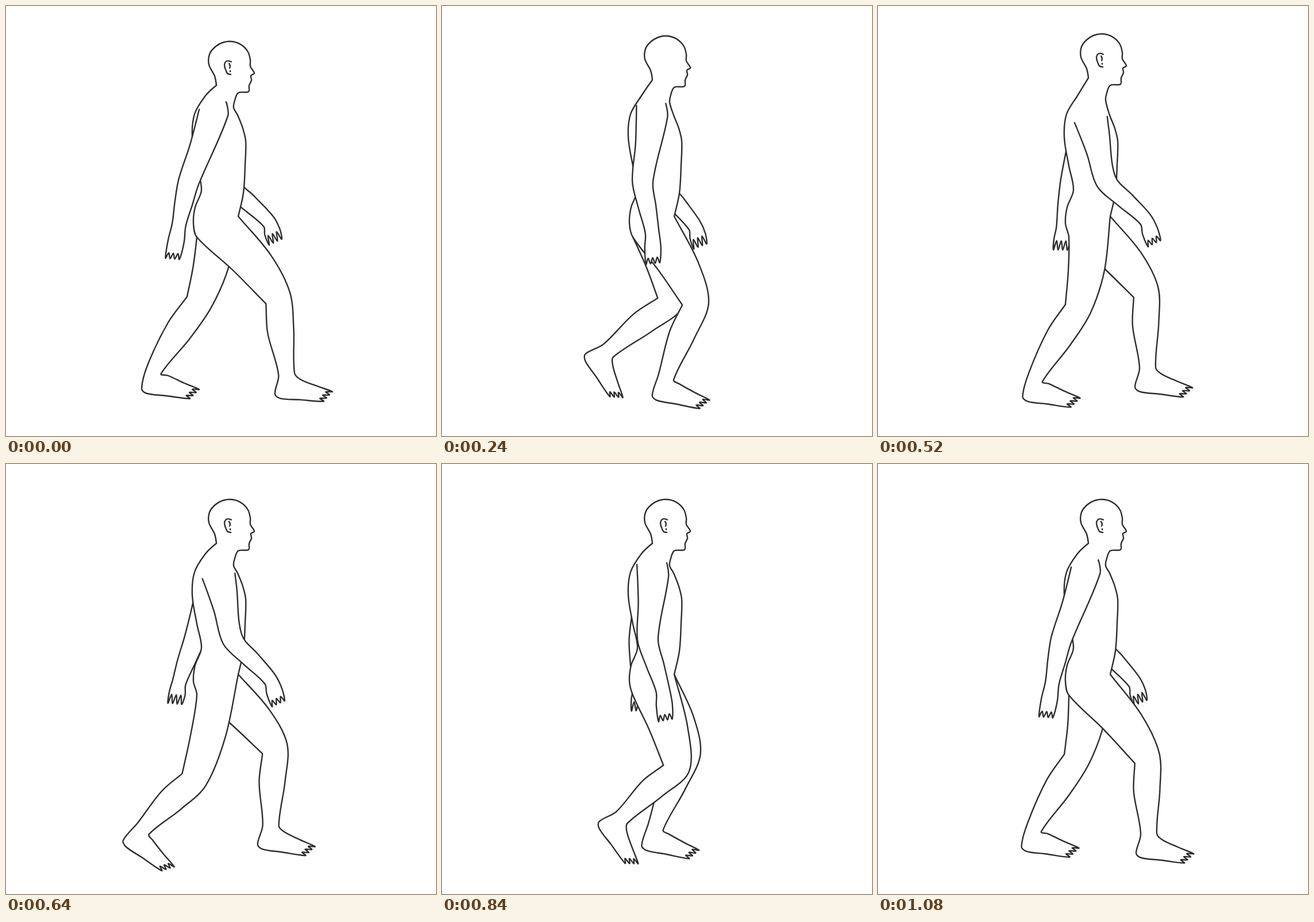
These frames come from a looping animation (748 by 748 pixels, 1120 ms). An HTML page:

```html
<!DOCTYPE html>
<html lang="en">
<head>
<meta charset="utf-8">
<title>Walk cycle</title>
<style>
html, body { margin: 0; width: 100%; height: 100%; overflow: hidden; background: #fff; }
svg { display: block; width: 100%; height: 100%; }
path { fill: #fff; stroke: #2d2d2e; stroke-width: 2.4; stroke-linecap: round; stroke-linejoin: round; }
#ear { fill: none; }
</style>
</head>
<body>
<svg viewBox="0 0 748 748">
  <path id="farArm"/>
  <path id="farLeg"/>
  <path id="body"/>
  <path id="nearArm"/>
  <path id="ear" d="M392 97Q382 92 380 102Q380 108 383 113Q384 119 391 119M388 100Q391 104 389 108M390 113v1"/>
</svg>
<script>
const LOOP = 1120, STEP = 40;
const BUTTOCK = [332, 402], GROIN = [404, 366], HIP = [366, 384];

// Stride poses: time, knee x y, ankle x y, foot pitch in degrees.
const STRIDE = [
  [0, 473, 508, 488, 640, -3],
  [160, 462, 513, 421, 645, 6],
  [240, 441, 518, 390, 645, 4],
  [400, 388, 523, 324, 646, 5],
  [560, 338, 529, 260, 646, 0],
  [640, 327, 549, 239, 634, 27],
  [720, 368, 540, 256, 620, 43],
  [820, 404, 529, 302, 613, 49],
  [960, 424, 531, 389, 644, 2],
  [1080, 468, 512, 471, 643, 0]
];

const BACK = [[366, 138], [347, 156], [328, 188], [324, 228], [332, 278], [340, 320], [329, 350], [326, 378]];
const CHEST = [[413, 325], [416, 275], [417, 235], [412, 213], [403, 190]];
const HEAD = [
  [396, 177], [398, 164], [404, 151], [422, 149], [423, 138], [427, 129], [426, 121], [432, 117], [425, 105],
  [425, 94], [421, 80], [410, 68], [395, 62], [379, 63], [364, 71], [354, 84], [353, 102], [363, 122]
];

const add = (p, q, k = 1) => [p[0] + k * q[0], p[1] + k * q[1]];
const mix = (p, q, u) => [p[0] + (q[0] - p[0]) * u, p[1] + (q[1] - p[1]) * u];
const ramp = (t, from, to) => Math.min(1, Math.max(0, (t - from) / (to - from)));

// Unit normal pointing forward for a limb running downward from p to q.
function normal(p, q) {
  const dx = q[0] - p[0], dy = q[1] - p[1], len = Math.hypot(dx, dy);
  return [dy / len, -dx / len];
}

const bulge = (p, q, u, amount) => add(mix(p, q, u), normal(p, q), amount);

// Maps limb-local points to the stage.
const placer = (origin, angle) => ([x, y]) => add(origin, [
  x * Math.cos(angle) - y * Math.sin(angle),
  x * Math.sin(angle) + y * Math.cos(angle)
]);

// Fingers or toes: tips between two points with a notch after each but the last.
function fringe(from, to, count, notch) {
  const pts = [from];
  for (let i = 1; i < count; i++) {
    pts.push(add(mix(from, to, (i - 0.5) / (count - 1)), notch), mix(from, to, i / (count - 1)));
  }
  return pts;
}

// Periodic monotone cubic blend of the stride poses.
function strideAt(time) {
  const t = time % LOOP, n = STRIDE.length;
  const key = i => STRIDE[(i + n) % n].map((v, c) => c ? v : v + LOOP * Math.floor(i / n));
  const i = STRIDE.findLastIndex(row => row[0] <= t);
  const [a, b, c, d] = [key(i - 1), key(i), key(i + 1), key(i + 2)];
  const h = c[0] - b[0], u = (t - b[0]) / h;
  const rate = (p, q, col) => (q[col] - p[col]) / (q[0] - p[0]);
  const slope = (r, s) => r * s <= 0 ? 0 : 2 * r * s / (r + s);
  return [1, 2, 3, 4, 5].map(col => {
    const r = rate(b, c, col), dv = r * h;
    const m0 = slope(rate(a, b, col), r) * h, m1 = slope(r, rate(c, d, col)) * h;
    return b[col] + u * (m0 + u * (3 * dv - 2 * m0 - m1 + u * (m0 + m1 - 2 * dv)));
  });
}

// Outline from buttock round the foot to groin; a doubled point makes a sharp corner.
function leg(t, shift) {
  const [kx, ky, ax, ay, pitch] = strideAt(t);
  const knee = add([kx, ky], shift), ankle = add([ax, ay], shift);
  const kneeSide = normal(HIP, ankle), ankleSide = normal(knee, ankle);
  const kneeBack = add(knee, kneeSide, -23), kneeFront = add(knee, kneeSide, 23);
  const ankleBack = add(ankle, ankleSide, -14), ankleFront = add(ankle, ankleSide, 14);
  const foot = [
    [-22, 34], [-13, 42], [20, 46],
    ...fringe([62, 51], [78, 35], 4, [-9, -3]),
    [52, 24], [24, 11]
  ];
  return [
    BUTTOCK, bulge(BUTTOCK, kneeBack, 0.5, 2), kneeBack, kneeBack,
    bulge(kneeBack, ankleBack, 0.4, -6), ankleBack,
    ...foot.map(placer(ankle, pitch * Math.PI / 180)),
    ankleFront, bulge(ankleFront, kneeFront, 0.55, -3), kneeFront,
    bulge(GROIN, kneeFront, 0.55, 9), GROIN, GROIN
  ];
}

// Pendulum arm, outlined from the back of the shoulder round the hand to its front.
function arm(t, reach, hand, fingers) {
  const s = -Math.cos(2 * Math.PI * t / LOOP);
  const back = [339 + 3 * s, 175 + 12 * s + 17 * s * s];
  const front = [391 + 8 * s, 172 + 13 * s + 8 * s * s];
  const elbow = [358 + reach * s, 305];
  const wrist = [384 + 83 * s, 393 - 5 * s - 18 * s * s];
  const elbowSide = normal(mix(back, front, 0.5), wrist), wristSide = normal(elbow, wrist);
  const elbowBack = add(elbow, elbowSide, -18), elbowFront = add(elbow, elbowSide, 18);
  const wristBack = add(wrist, wristSide, -12), wristFront = add(wrist, wristSide, 12);
  const palm = [
    [-14, hand * 0.45],
    ...fringe([-13, hand - 4], [11, hand - 6], 4, [0, -fingers]),
    [14, hand * 0.45]
  ];
  return [
    back, bulge(back, elbowBack, 0.5, 2), elbowBack, bulge(elbowBack, wristBack, 0.5, -1), wristBack,
    ...palm.map(placer(wrist, -(6 + 16 * s) * Math.PI / 180)),
    wristFront, mix(wristFront, elbowFront, 0.5), elbowFront, add(front, [3, 24]), front
  ];
}

// Smooth open curve through points, with handles scaled to segment lengths.
function curve(pts) {
  const gap = i => Math.hypot(pts[i + 1][0] - pts[i][0], pts[i + 1][1] - pts[i][1]);
  const handle = (i, seg, sign) => {
    if (i === 0 || i === pts.length - 1) return pts[i];
    const k = sign * gap(seg) / (gap(i - 1) + gap(i) + 1e-6) / 3;
    return add(pts[i], add(pts[i + 1], pts[i - 1], -1), k);
  };
  const str = p => p.map(v => v.toFixed(1)).join(" ");
  let d = "M" + str(pts[0]);
  for (let i = 0; i < pts.length - 1; i++) {
    d += "C" + [handle(i, i, 1), handle(i + 1, i, -1), pts[i + 1]].map(str).join(" ");
  }
  return d;
}

const part = id => document.getElementById(id);
const draw = (id, pts) => part(id).setAttribute("d", curve(pts));

function render(ms) {
  const t = Math.floor(ms % LOOP / STEP) * STEP;
  const lift = 13 * (ramp(t, 160, 270) - ramp(t, 560, 600));
  const raise = p => add(p, [0, -lift]);
  const [nape, ...spine] = BACK;

  draw("farArm", arm(t + 470, 30, 43, 16));
  draw("farLeg", leg(t + LOOP / 2, [-2, -14]));
  draw("body", [raise(nape), ...spine, ...leg(t, [0, 0]), ...CHEST, ...HEAD.map(raise), raise(nape)]);
  draw("nearArm", arm(t, 40, 58 + 8 * Math.cos(2 * Math.PI * t / LOOP), 10));

  part("ear").setAttribute("transform", `translate(0 ${-lift})`);
  part("ear").style.display = t >= 200 && t < 320 ? "none" : "";
}

function tick() {
  render(performance.now());
  requestAnimationFrame(tick);
}
tick();
</script>
</body>
</html>
```
